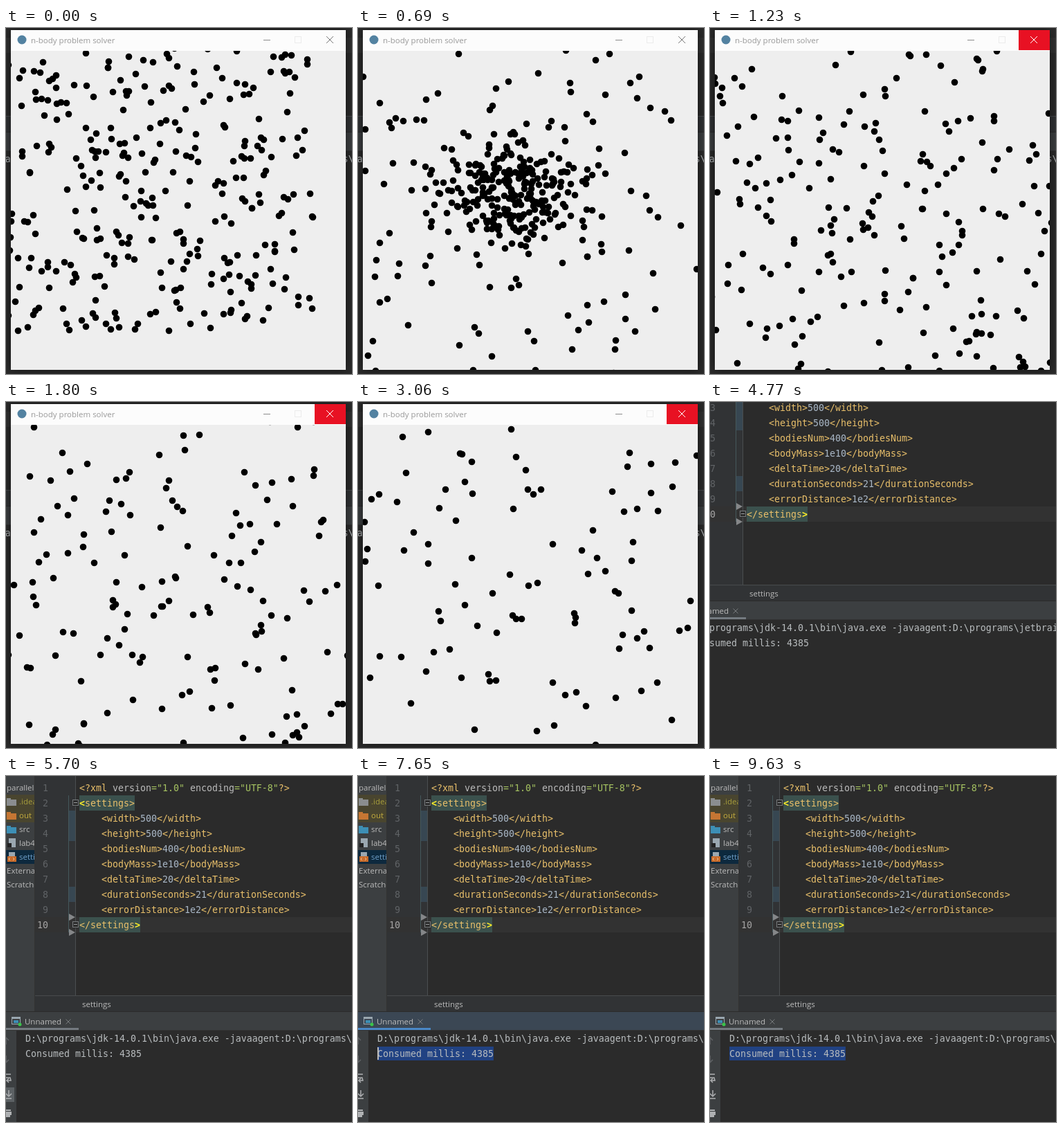
These frames come from a looping animation (500x500 px, 9.66 s). An HTML page with a canvas:

```html
<!DOCTYPE html>
<html lang="en">
<head>
<meta charset="utf-8">
<title>n-body problem solver</title>
<style>
html, body { margin: 0; width: 100%; height: 100%; overflow: hidden; background: #2b2b2b; }
canvas { display: block; }
</style>
</head>
<body>
<canvas id="stage" width="500" height="500"></canvas>
<script>
const ctx = document.getElementById('stage').getContext('2d');
const LOOP = 9660, STEP = 30, WIDE = 1100;
const MONO = '13.29px "DejaVu Sans Mono", "Noto Sans Mono", monospace';
const BOLD = 'bold ' + MONO;
const SANS = '11.5px "Open Sans", "Noto Sans", sans-serif';
const TAG = '#e8bf6a', PLAIN = '#a9b7c6', OUTPUT = '#b8bcbe', PANEL = '#3c3f41', EDITOR = '#2b2b2b';
const COMMAND = 'D:\\programs\\jdk-14.0.1\\bin\\java.exe -javaagent:D:\\programs\\jetbrains\\apps\\IDEA-U\\ch-0\\202.7660.26\\lib\\idea_rt.jar=61234:D:\\programs\\jetbrains\\apps\\IDEA-U';
const RESULT = 'Consumed millis: 4385';
const SETTINGS = [['width', '500'], ['height', '500'], ['bodiesNum', '400'], ['bodyMass', '1e10'],
  ['deltaTime', '20'], ['durationSeconds', '21'], ['errorDistance', '1e2']];

// Distance from the solver window to the final view, and the turn between both drag phases.
const FAR = [581, 190], NEAR = 53;
const DRAG_START = 4080, DRAG_TURN = 4770, DRAG_END = 5700;

const clamp = v => Math.max(0, Math.min(1, v));

function rect(x, y, w, h, color) {
  ctx.fillStyle = color;
  ctx.fillRect(x, y, w, h);
}

function text(str, x, y, color, font = SANS) {
  ctx.font = font;
  ctx.fillStyle = color;
  ctx.fillText(str, x, y);
  return x + ctx.measureText(str).width;
}

function runs(parts, x, y) {
  for (const [str, color, font = MONO] of parts) x = text(str, x, y, color, font);
}

function line(color, width, ...points) {
  ctx.strokeStyle = color;
  ctx.lineWidth = width;
  ctx.beginPath();
  for (let i = 0; i < points.length; i += 2) ctx.lineTo(points[i], points[i + 1]);
  ctx.stroke();
}

function disc(x, y, r, color) {
  ctx.fillStyle = color;
  ctx.beginPath();
  ctx.arc(x, y, r, 0, Math.PI * 2);
  ctx.fill();
}

function cross(x, y, r, color) {
  line(color, 1, x - r, y - r, x + r, y + r);
  line(color, 1, x - r, y + r, x + r, y - r);
}

// Bodies fall into a shared cluster, burst out of it, and slow down to a drift.
let seed = 20417;
function random() {
  seed = (seed * 1664525 + 1013904223) % 4294967296;
  return seed / 4294967296;
}
const bell = () => (random() + random() + random() + random() - 2) * 1.73;

const bodies = Array.from({ length: 400 }, () => {
  const x = -50 + random() * 495, y = -20 + random() * 458;
  const cx = 220 + bell() * 42, cy = 236 + bell() * 34;
  const angle = random() * Math.PI * 2, reach = Math.sqrt(random());
  const meet = random() < 0.45 ? 250 + random() * 300 : 700 + bell() * 50;
  return { x, y, cx, cy, meet, dx: Math.cos(angle) * reach, dy: Math.sin(angle) * reach };
});

function bodyAt(b, t) {
  if (t < b.meet) {
    const k = Math.pow(t / b.meet, 1.7);
    return [b.x + (b.cx - b.x) * k, b.y + (b.cy - b.y) * k];
  }
  const age = t - b.meet;
  const radius = 340 * (1 - Math.exp(-age / 220)) + 0.089 * age;
  return [b.cx + b.dx * radius, b.cy + b.dy * radius];
}

function drawSolver(t) {
  ctx.save();
  ctx.shadowColor = 'rgba(0,0,0,.55)';
  ctx.shadowBlur = 14;
  rect(7, 3, 484, 491, '#eeeeee');
  ctx.restore();
  rect(7, 3, 484, 30, '#fcfcfc');
  disc(23, 17, 6.5, '#5382a1');
  text('n-body problem solver', 36, 22, '#999999');
  line('#8c8c8c', 1, 372, 17.5, 382, 17.5);
  ctx.strokeStyle = '#ececec';
  ctx.strokeRect(417.5, 12.5, 9, 9);
  const hover = clamp((t - 960) / 120);
  ctx.globalAlpha = hover;
  rect(446, 3, 45, 29, '#e81123');
  ctx.globalAlpha = 1;
  cross(468, 17, 5, hover > 0.5 ? '#ffffff' : '#777777');

  ctx.save();
  ctx.beginPath();
  ctx.rect(7, 33, 484, 461);
  ctx.clip();
  for (const b of bodies) {
    const [x, y] = bodyAt(b, Math.min(t, 3660));
    disc(Math.round(x) + 0.5, Math.round(y) + 0.5, 4.8, '#000000');
  }
  ctx.restore();
}

function folder(x, y, color) {
  rect(x, y - 5, 6, 3, color);
  rect(x, y - 3, 14, 9, color);
}

function drawProject() {
  rect(-600, 0, 641, 341, PANEL);
  ctx.save();
  ctx.beginPath();
  ctx.rect(-600, 0, 641, 341);
  ctx.clip();
  rect(-600, 27, 641, 40, '#49452f');
  rect(-600, 107, 641, 20, '#0d293e');
  text('parallel-lab', 1, 21, '#bbbbbb');
  folder(1, 37, '#8a8d8f');
  text('.idea', 19, 41, '#a59c3c');
  folder(1, 57, '#c57633');
  text('out', 19, 61, '#c5ae3f');
  folder(1, 77, '#3d8fb5');
  text('src', 19, 81, '#bbbbbb');
  rect(4, 90, 10, 13, '#9aa7b0');
  rect(2, 97, 6, 6, '#222222');
  text('lab4.iml', 19, 101, '#bbbbbb');
  rect(4, 110, 9, 6, '#9aa7b0');
  rect(2, 116, 13, 8, '#c76b2b');
  line('#f0c090', 1, 6, 118, 4, 120, 6, 122);
  line('#f0c090', 1, 10, 118, 12, 120, 10, 122);
  text('settings.xml', 19, 121, '#6f9fc8');
  text('External Libraries', 1, 141, '#bbbbbb');
  text('Scratches', 1, 161, '#bbbbbb');
  ctx.restore();
  rect(41, 0, 1, 341, '#323232');
}

function foldMark(y) {
  rect(96, y - 5, 9, 10, EDITOR);
  ctx.strokeStyle = '#777b7d';
  ctx.lineWidth = 1;
  ctx.strokeRect(96.5, y - 4.5, 8, 8);
  line('#9a9d9f', 1, 98, y - 0.5, 103, y - 0.5);
}

function drawEditor() {
  rect(42, -10, WIDE, 328, EDITOR);
  rect(42, -10, 58, 328, '#313335');
  rect(42, 204, WIDE, 22, '#323232');
  rect(90, 50, 10, 44, '#374752');
  rect(90, 160, 10, 22, '#374752');
  rect(90, 28, 1, 198, '#45585b');
  rect(100, -10, 1, 328, '#4b4e50');
  rect(106, 28, 80, 22, '#3b514d');
  rect(106, 204, 88, 22, '#3b514d');

  ctx.textAlign = 'right';
  for (let n = 1; n <= 10; n++) text(n, 61, n * 22, n === 10 ? '#a4a3a3' : '#606366', MONO);
  ctx.textAlign = 'left';

  for (const y of [204, 226]) {
    ctx.fillStyle = '#858789';
    ctx.beginPath();
    ctx.moveTo(91, y - 5);
    ctx.lineTo(100, y);
    ctx.lineTo(91, y + 5);
    ctx.fill();
  }
  foldMark(39);
  foldMark(215);

  runs([['<?xml ', TAG], ['version', '#bababa'], ['="1.0" ', '#a5c261'],
    ['encoding', '#bababa'], ['="UTF-8"', '#a5c261'], ['?>', TAG]], 106, 22);
  runs([['<', '#ffef28', BOLD], ['settings>', TAG]], 106, 44);
  SETTINGS.forEach(([name, value], i) =>
    runs([[`<${name}>`, TAG], [value, PLAIN], [`</${name}>`, TAG]], 138, 66 + i * 22));
  runs([['</settings', TAG], ['>', '#ffef28', BOLD]], 106, 220);

  rect(42, 317, WIDE, 24, '#313335');
  rect(42, 317, WIDE, 1, '#484b4d');
  text('settings', 110, 334, '#bbbbbb');
}

function drawTools(lit) {
  rect(-600, 368, 615, 400, PANEL);
  if (lit) rect(-6, 450, 18, 21, '#5c6164');
  const dim = '#606366', bright = '#afb1b3';
  line(dim, 1.5, 0, 388, 0, 378);
  line(dim, 1.5, -4, 382, 0, 378, 4, 382);
  line(dim, 1.5, 0, 404, 0, 414);
  line(dim, 1.5, -4, 410, 0, 414, 4, 410);
  line(bright, 1.5, -4, 431, 7, 431);
  line(bright, 1.5, -4, 436, 6, 436, 7, 440, 1, 440);
  line(bright, 1.5, 4, 437, 1, 440, 4, 443);
  line(bright, 1.5, 4, 454, 4, 462);
  line(bright, 1.5, 0, 459, 4, 463, 8, 459);
  line(bright, 1.5, -4, 466, 8, 466);
  rect(-4, 482, 11, 2, bright);
  rect(-6, 485, 14, 5, bright);
  rect(-3, 490, 9, 3, bright);
}

function drawConsole(t) {
  const focused = t >= 6900 && t < 9600;
  rect(-600, 341, WIDE + 600, 27, focused ? '#3b4754' : PANEL);
  rect(-600, 340, WIDE + 600, 1, '#2b2b2b');
  rect(-600, 367, WIDE + 600, 1, '#323232');
  rect(0, 364, 105, 3, focused ? '#4a88c7' : '#747a80');
  ctx.strokeStyle = '#9aa7b0';
  ctx.lineWidth = 1;
  ctx.strokeRect(8.5, 348.5, 12, 10);
  rect(8, 348, 13, 3, '#9aa7b0');
  rect(11, 353, 7, 4, '#3d8fb5');
  disc(20, 359, 2.5, '#39c54a');
  text('Unnamed', 27, 359, '#bbbbbb');
  cross(90, 355, 3.5, '#777b7d');

  rect(15, 368, WIDE, 400, EDITOR);
  drawTools(t < 6900);

  const chars = Math.round(RESULT.length * clamp((t - 6930) / 720));
  ctx.font = MONO;
  const end = 28 + ctx.measureText(RESULT).width;
  const start = end - ctx.measureText(RESULT.slice(RESULT.length - chars)).width;
  const overshoot = t >= 7830 && t < 7860;
  if (overshoot) rect(28, 368, WIDE, 23, '#214283');
  if (chars) rect(start, 391, end - start, 20, '#214283');
  text(COMMAND, 28, 384, OUTPUT, MONO);
  text(RESULT, 28, 406, OUTPUT, MONO);
  const blinkOff = t >= 8820 && t < 9300;
  if (focused && !blinkOff) rect(start, overshoot ? 370 : 392, 2, 18, '#bbbbbb');
}

// The view is dragged off the solver window, then drifts steadily into place.
function panAt(t) {
  const drift = NEAR / (DRAG_END - DRAG_TURN);
  if (t >= DRAG_TURN) {
    const d = drift * Math.max(0, DRAG_END - t);
    return [d, d];
  }
  const s = clamp((t - DRAG_START + STEP) / (DRAG_TURN - DRAG_START + STEP));
  const ease = s * s * (3 - 2 * s);
  const settle = drift * (DRAG_TURN - DRAG_START) * s * s * (1 - s);
  return FAR.map(far => far + (NEAR - far) * ease + settle);
}

function render(t) {
  const [px, py] = panAt(t).map(Math.round);
  rect(0, 0, 500, 500, EDITOR);
  ctx.save();
  ctx.translate(-px, -py);
  drawEditor();
  drawProject();
  drawConsole(t);
  if (t < DRAG_TURN) {
    ctx.translate(...FAR);
    drawSolver(t);
  }
  ctx.restore();
}

const origin = performance.now();
function tick() {
  const t = (performance.now() - origin) % LOOP;
  render(Math.floor(t / STEP) * STEP);
  requestAnimationFrame(tick);
}
tick();
</script>
</body>
</html>
```
